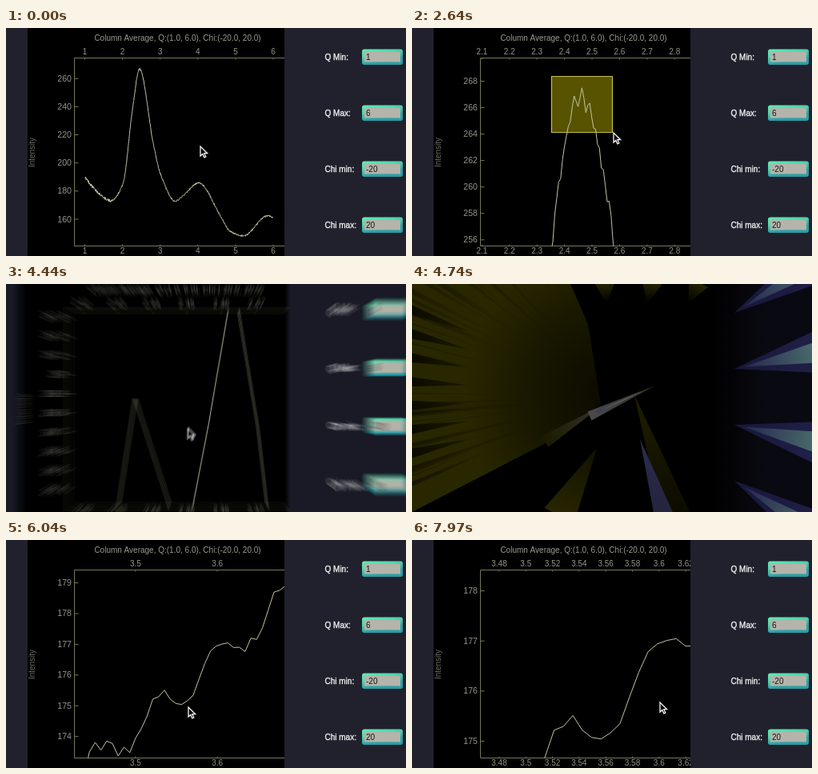
An HTML page with a canvas for the animation above (8000 ms loop, 500 by 285 pixels).

```html
<!DOCTYPE html>
<html lang="en">
<head>
<meta charset="utf-8">
<title>Plot zoom</title>
<style>
  html, body { margin: 0; width: 100%; height: 100%; overflow: hidden; background: #20212c; }
  canvas { display: block; width: 100vw; height: 100vh; }
</style>
</head>
<body>
<canvas id="stage"></canvas>
<script>
const W = 500, H = 285, LOOP = 8000;
const LEFT = 85.5, RIGHT = 348, TOP = 37.5, BOTTOM = 272.5;
const FONT = '"Liberation Sans", Arial, sans-serif';
const ratio = Math.max(1, window.devicePixelRatio || 1);

const canvas = document.getElementById('stage');
const scene = document.createElement('canvas');
for (const c of [canvas, scene]) {
  c.width = W * ratio;
  c.height = H * ratio;
}
const out = canvas.getContext('2d');
const ctx = scene.getContext('2d');

const clamp = p => Math.min(1, Math.max(0, p));
const mix = (a, b, p) => a + (b - a) * p;
const smooth = p => p * p * (3 - 2 * p);
const span = (t, a, b) => clamp((t - a) / (b - a));

let seed = 17;
const random = () => (seed = seed * 16807 % 2147483647) / 2147483647;

// --- Data: a monotone spline through key points, two local ripples, seeded noise
const knots = [
  [1, 190], [1.31, 180], [1.69, 173.2], [2.01, 185], [2.26, 237], [2.455, 266.8],
  [2.81, 215], [3, 192.8], [3.4, 172.8], [3.6, 176.5], [4.026, 185.8], [4.6, 162.3],
  [4.85, 151.5], [5.21, 148.2], [5.86, 162.5], [6.05, 160.3]
];
const ripples = [
  { x: 2.449, period: 0.029, depth: 0.75, reach: 0.05 },
  { x: 3.563, period: 0.072, depth: 0.6, reach: 0.12 }
];

const secant = i => (knots[i + 1][1] - knots[i][1]) / (knots[i + 1][0] - knots[i][0]);

// Flat at extremes, otherwise the harmonic mean of the neighbouring slopes.
function slope(i) {
  if (i === 0) return secant(0);
  if (i === knots.length - 1) return secant(i - 1);
  const a = secant(i - 1), b = secant(i);
  return a * b > 0 ? 2 * a * b / (a + b) : 0;
}

function spline(x) {
  const i = knots.findIndex(k => k[0] > x) - 1;
  const [xa, ya] = knots[i], [xb, yb] = knots[i + 1];
  const h = xb - xa, s = (x - xa) / h, r = 1 - s;
  return mix(ya, yb, smooth(s)) + h * s * r * (slope(i) * r - slope(i + 1) * s);
}

function sample(x) {
  let y = spline(x), noise = (random() - 0.5) * (x < 1.7 ? 1.9 : 1.2);
  for (const r of ripples) {
    const near = Math.exp(-(((x - r.x) / r.reach) ** 2));
    y -= r.depth * near * Math.cos(2 * Math.PI * (x - r.x) / r.period);
    noise *= 1 - 0.85 * near;
  }
  return [x, y + noise];
}

const data = Array.from({ length: 709 }, (_, i) => sample(1.0037 + 0.0070519 * i));

// --- Views: value at the lower left corner and pixels per unit
const view = (u, v, sx, sy) => ({ u, v, sx, sy });

function fit(w, [xa, ya, xb, yb]) {
  return view(w.u + (xa - 85) / w.sx, w.v + (272 - yb) / w.sy,
    w.sx * 263 / (xb - xa), w.sy * 235 / (yb - ya));
}

const pan = (w, dx, dy) => view(w.u - dx / w.sx, w.v + dy / w.sy, w.sx, w.sy);

// Geometric zoom that keeps one screen point fixed; a plain pan at equal scale.
function blend(a, b, p) {
  const axis = (from, to, sa, sb) => {
    const K = sb / sa, k = K ** p;
    const share = Math.abs(K - 1) < 1e-6 ? p : (1 - 1 / k) / (1 - 1 / K);
    return [mix(from, to, share), sa * k];
  };
  const [u, sx] = axis(a.u, b.u, a.sx, b.sx);
  const [v, sy] = axis(a.v, b.v, a.sy, b.sy);
  return view(u, v, sx, sy);
}

const boxes = [
  { start: 870, stop: 1460, release: 1680, rect: [150, 46, 186, 71] },
  { start: 2150, stop: 2600, release: 2800, rect: [174, 60, 250, 130] },
  { start: 3300, stop: 3720, release: 3950, rect: [162, 95, 237, 152] }
];
const full = view(0.713, 141.23, 47.1, 1.758);
const peak = fit(full, boxes[0].rect);
const tip = view(2.3513, 264.16, 1190, 55.7);
const summit = fit(tip, boxes[2].rect);
const valley = view(2.3217, 160.255, 115, 4.31);
const close = view(3.4788, 173.952, 1665, 62.6);
const panned = pan(close, 22, 45);

const WARP = [4430, 5050];
const WARP_MID = (WARP[0] + WARP[1]) / 2;

function viewAt(t) {
  if (t < boxes[0].release) return full;
  if (t < boxes[1].release) return peak;
  if (t < boxes[2].release) return tip;
  if (t < WARP_MID) return summit;
  if (t < 5300) return blend(full, valley, span(t, 5060, 5200));
  if (t < 7150) return blend(valley, close, smooth(span(t, 5350, 6300)));
  return blend(close, panned, smooth(span(t, 7150, 7970)));
}

// The pointer drags each box, then zooms at two spots and pans.
const path = [
  [0, 243, 148], [450, 243, 148],
  ...boxes.flatMap(({ start, stop, release, rect: [xa, ya, xb, yb] }) =>
    [[start, xa, ya], [stop, xb + 2, yb + 1], [release, xb + 2, yb + 1]]),
  [5050, 214, 214], [5210, 214, 214], [5350, 228, 209], [6300, 228, 209],
  [6910, 274, 145], [7150, 288, 158], [7970, 310, 203]
];

function cursorAt(t) {
  const i = path.findIndex(k => k[0] > t);
  if (i < 0) return path[path.length - 1].slice(1);
  const [ta, xa, ya] = path[i - 1], [tb, xb, yb] = path[i];
  const p = smooth(span(t, ta, tb));
  return [mix(xa, xb, p), mix(ya, yb, p)];
}

// --- Drawing
function text(str, x, y, color, align = 'left', size = 10) {
  ctx.font = `${size}px ${FONT}`;
  ctx.textAlign = align;
  ctx.fillStyle = color;
  ctx.fillText(str, x, y);
}

function line(points, color, width = 1) {
  ctx.beginPath();
  points.forEach(([x, y]) => ctx.lineTo(x, y));
  ctx.strokeStyle = color;
  ctx.lineWidth = width;
  ctx.stroke();
}

function clipped(x, y, w, h, draw) {
  ctx.save();
  ctx.beginPath();
  ctx.rect(x, y, w, h);
  ctx.clip();
  draw();
  ctx.restore();
}

// Smallest step of 1 or 2 times a power of ten whose labels have room.
function tickStep(scale, room) {
  for (let e = -4; e < 4; e++) {
    for (const m of [1, 2]) {
      const step = m * 10 ** e;
      if (step * scale >= room(Math.max(0, -e))) return step;
    }
  }
  return 10000;
}

function ticks(from, to, step, draw) {
  for (let i = Math.ceil(from / step - 1e-6); i * step <= to; i++) {
    draw(i * step, String(+(i * step).toFixed(5)));
  }
}

function drawAxes(w) {
  const axis = '#77775c', label = '#94948a';
  line([[RIGHT, TOP], [LEFT, TOP], [LEFT, BOTTOM], [RIGHT, BOTTOM]], axis);

  const stepX = tickStep(w.sx, d => d ? 7 * (d + 2) : 20);
  ticks(w.u, w.u + 263 / w.sx, stepX, (value, str) => {
    const x = 85 + (value - w.u) * w.sx;
    line([[x, TOP], [x, TOP + 2]], axis);
    line([[x, BOTTOM], [x, BOTTOM - 2]], axis);
    text(str, x, 33, label, 'center');
    text(str, x, 281.5, label, 'center');
  });

  const stepY = tickStep(w.sy, () => 22);
  ticks(w.v, w.v + 235 / w.sy, stepY, (value, str) => {
    const y = 272 - (value - w.v) * w.sy;
    line([[LEFT, y], [LEFT + 5, y]], axis);
    text(str, 82, y + 3.5, label, 'right', 10.6);
  });
}

function drawPlot(t) {
  const w = viewAt(t);
  ctx.fillStyle = '#000';
  ctx.fillRect(27, 0, RIGHT - 27, H);
  text('Column Average, Q:(1.0, 6.0), Chi:(-20.0, 20.0)', 214.5, 15.5, '#9a9a90', 'center');
  ctx.save();
  ctx.translate(36, 155.5);
  ctx.rotate(-Math.PI / 2);
  text('Intensity', 0, 0, '#6a6a64', 'center');
  ctx.restore();
  drawAxes(w);

  clipped(LEFT, TOP, RIGHT - LEFT, BOTTOM - TOP, () => {
    const box = boxes.find(b => t >= b.start && t < b.release);
    if (box) {
      const [x, y, xb, yb] = box.rect;
      const p = smooth(span(t, box.start, box.stop));
      const rect = [x + 0.5, y + 0.5, (xb - x) * p, (yb - y) * p];
      ctx.fillStyle = '#575300';
      ctx.fillRect(...rect);
      ctx.strokeStyle = '#c6c047';
      ctx.lineWidth = 1.2;
      ctx.strokeRect(...rect);
    }
    line(data.map(([x, y]) => [85 + (x - w.u) * w.sx, 272 - (y - w.v) * w.sy]), '#c4c3a4');
  });
}

function drawField(label, value, y) {
  text(label, 398.5, y + 3.5, '#f0f0f0');
  ctx.strokeStyle = '#f0f0f0';
  ctx.lineWidth = 0.35;
  ctx.strokeText(label, 398.5, y + 3.5);

  const edge = ctx.createLinearGradient(445, y - 10, 449, y + 10);
  edge.addColorStop(0, '#5ef2b4');
  edge.addColorStop(0.5, '#50d6b0');
  edge.addColorStop(1, '#2a9ea8');
  ctx.fillStyle = edge;
  ctx.beginPath();
  ctx.roundRect(445, y - 9.5, 51, 19.5, 3);
  ctx.fill();
  ctx.fillStyle = '#b4b4aa';
  ctx.fillRect(448, y - 6.5, 45, 13);
  text(value, 450, y + 3.5, '#151515');
}

const pointer = new Path2D('M0 0V12L2.8 9.4L4.8 13.8L6.8 12.9L4.9 8.7H8.7Z');

function drawCursor([x, y]) {
  ctx.save();
  ctx.translate(x, y);
  ctx.fillStyle = '#000';
  ctx.fill(pointer);
  ctx.strokeStyle = '#f4f4f4';
  ctx.lineWidth = 1.3;
  ctx.lineJoin = 'miter';
  ctx.stroke(pointer);
  ctx.restore();
}

const rowY = i => 36 + 70 * i;

function drawScene(t) {
  ctx.setTransform(ratio, 0, 0, ratio, 0, 0);
  ctx.lineJoin = 'round';
  ctx.fillStyle = '#20212c';
  ctx.fillRect(0, 0, W, H);
  clipped(27, 0, RIGHT - 27, H, () => drawPlot(t));
  [['Q Min:', '1'], ['Q Max:', '6'], ['Chi min:', '-20'], ['Chi max:', '20']]
    .forEach(([label, value], i) => drawField(label, value, rowY(i)));
  drawCursor(cursorAt(t));
}

// --- Radial streaks between the two halves
const CX = 255, CY = 140;

// A triangle from its tip to a base of the given half width, shaded lengthwise.
function wedge(x, y, bx, by, half, from, to) {
  const length = Math.hypot(bx - x, by - y);
  const nx = (y - by) / length * half, ny = (bx - x) / length * half;
  const shade = out.createLinearGradient(x, y, bx, by);
  shade.addColorStop(0, from);
  shade.addColorStop(1, to);
  out.fillStyle = shade;
  out.beginPath();
  out.moveTo(x, y);
  out.lineTo(bx + nx, by + ny);
  out.lineTo(bx - nx, by - ny);
  out.fill();
}

const rays = Array.from({ length: 45 }, () => ({
  angle: mix(2.65, 4.3, random()), near: mix(60, 170, random()), half: mix(1, 4, random())
}));

function drawStreaks() {
  out.fillStyle = '#000';
  out.fillRect(0, 0, W, H);

  // Olive field on the left, broken by dark rays and fingers from the edge
  const olive = out.createRadialGradient(CX, CY, 25, CX, CY, 190);
  olive.addColorStop(0, '#0d0c00');
  olive.addColorStop(0.5, '#181700');
  olive.addColorStop(1, '#292700');
  out.fillStyle = olive;
  out.fill(new Path2D('M0 0H198L220 50L236 150L165 200L0 285Z'));
  for (const { angle, near, half } of rays) {
    const c = Math.cos(angle), s = Math.sin(angle);
    wedge(CX + c * near, CY + s * near, CX + c * 310, CY + s * 310, half,
      'rgba(0,0,0,0)', 'rgba(0,0,0,0.35)');
  }
  for (let y = 32; y < 240; y += 30) {
    wedge(70, mix(y, CY, 0.25), -2, y, 6, '#1c1b00', '#0a0a00');
  }

  // Short rays above, longer ones below
  for (let x = 243; x < 350; x += 51) wedge(x, 24, mix(CX, x, 1.15), -2, 13, '#000', '#262400');
  wedge(278, 139, 330, 290, 18, '#201e00', '#0c0b00');
  wedge(231, 205, 184, 290, 21, '#121100', '#282600');
  wedge(285, 194, 315, 290, 12, '#2c2c50', '#24243c');

  // The four fields, pulled outwards
  const side = out.createLinearGradient(370, 0, 440, 0);
  side.addColorStop(0, '#08081000');
  side.addColorStop(1, '#090911');
  out.fillStyle = side;
  out.fillRect(370, 0, 130, H);
  for (let i = 0; i < 4; i++) {
    const y = rowY(i), far = mix(CY, y, 1.6);
    wedge(403, y, 505, far, 26, '#17173a', '#202048');
    wedge(415, mix(y, far, 0.12), 505, far, 13, '#26264e', '#4a6c6c');
  }

  // Thin bright sliver across the middle
  wedge(236, 153, 166, 197, 8, '#34332a', '#1b1a00');
  wedge(304, 127, 222, 165, 6, '#2c2b10', '#4a4a4c');
  wedge(288, 134, 232, 160, 2, '#70707c', '#3c3c50');
}

function drawWarp(t) {
  const force = Math.sin(Math.PI * span(t, ...WARP));
  const copies = 14;
  for (let i = 0; i < copies; i++) {
    const zoom = 1 + force * 1.6 * i / copies;
    out.globalAlpha = 1 / (i + 1);
    out.drawImage(scene, CX - CX * zoom, CY - CY * zoom, W * zoom, H * zoom);
  }
  out.globalAlpha = smooth(clamp(force * 1.3 - 0.3));
  drawStreaks();
  out.globalAlpha = 1;
}

function render(now) {
  const t = now % LOOP;
  drawScene(t);
  out.setTransform(ratio, 0, 0, ratio, 0, 0);
  out.drawImage(scene, 0, 0, W, H);
  if (t > WARP[0] && t < WARP[1]) drawWarp(t);
}

function tick() {
  render(performance.now());
  requestAnimationFrame(tick);
}
tick();
</script>
</body>
</html>
```
